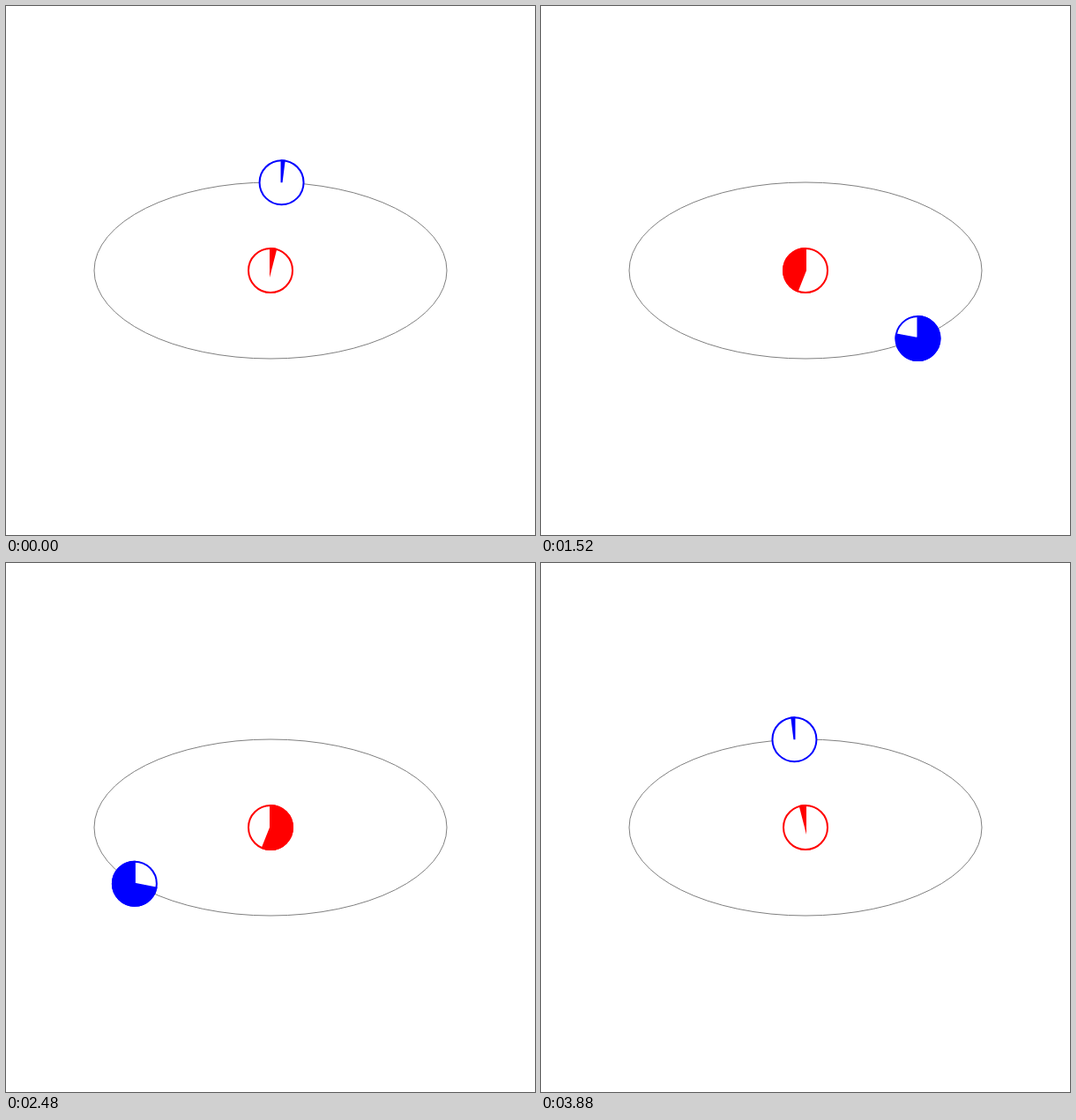
Animation, 600 px wide and 600 px high, one loop 3.92 s. Source, as an HTML page with a canvas:

```html
<!DOCTYPE html>
<html lang="en">
<head>
<meta charset="utf-8">
<title>Orbit</title>
<style>
  html, body { margin: 0; width: 100%; height: 100%; overflow: hidden; background: #fff; }
  canvas { display: block; width: 600px; height: 600px; }
</style>
</head>
<body>
<canvas id="stage" width="600" height="600"></canvas>
<script>
const ctx = document.getElementById('stage').getContext('2d');
const TURN = 2 * Math.PI;
const STEP = 40, STEPS = 98;
const CX = 300, CY = 300, RX = 200, RY = 100, R = 25;

// Fills clockwise from the top while phase is 0..1, then empties the same way for 1..2.
function dial(x, y, phase, color) {
  ctx.lineWidth = 2;
  ctx.strokeStyle = color;
  ctx.fillStyle = '#fff';
  ctx.beginPath();
  ctx.arc(x, y, R, 0, TURN);
  ctx.fill();
  ctx.stroke();

  phase %= 2;
  ctx.fillStyle = color;
  if (phase === 1) {
    ctx.fill();
    return;
  }
  const from = phase > 1 ? phase - 1 : 0;
  const to = phase > 1 ? 1 : phase;
  ctx.beginPath();
  ctx.moveTo(x, y);
  ctx.arc(x, y, R, (from - 0.25) * TURN, (to - 0.25) * TURN);
  ctx.closePath();
  ctx.fill();
  ctx.stroke();
}

function draw(time) {
  const k = Math.floor(time / STEP + 0.01) % STEPS;
  // Hundredths of a turn; the top and bottom positions are skipped.
  const n = k + (k < STEPS / 2 ? 1 : 2);
  const angle = n / 100 * TURN;

  ctx.fillStyle = '#fff';
  ctx.fillRect(0, 0, 600, 600);
  ctx.lineWidth = 1;
  ctx.strokeStyle = '#808080';
  ctx.beginPath();
  ctx.ellipse(CX, CY, RX, RY, 0, 0, TURN);
  ctx.stroke();

  dial(CX, CY, n / 25, '#f00');
  dial(CX + RX * Math.sin(angle), CY - RY * Math.cos(angle), n / 50, '#00f');
}

function loop() {
  draw(performance.now());
  requestAnimationFrame(loop);
}
loop();
</script>
</body>
</html>
```
